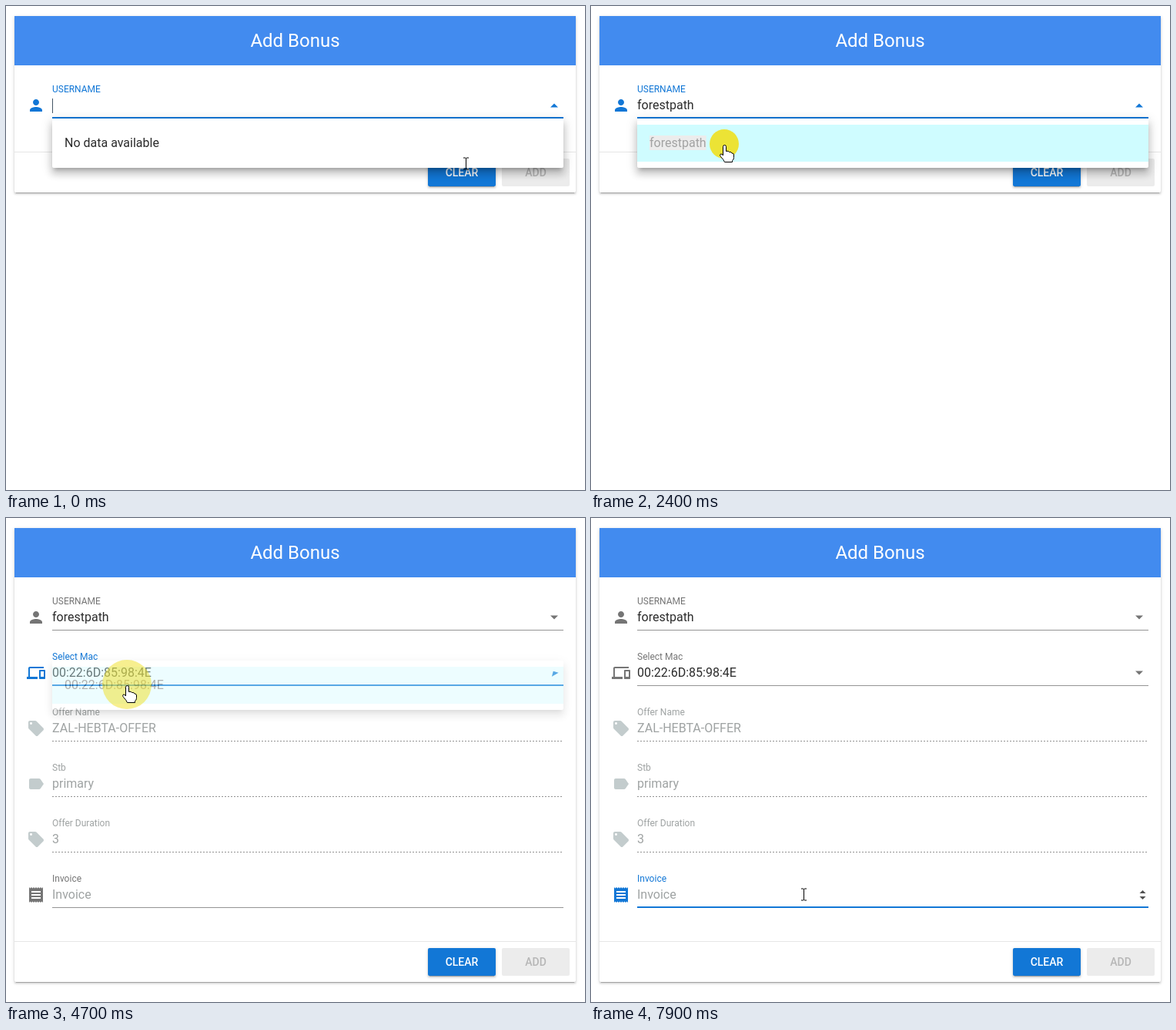
Animation, 752 px wide and 628 px high, one loop 8000 ms. Source, as an HTML page:

```html
<!DOCTYPE html>
<html lang="en">
<head>
<meta charset="utf-8">
<title>Add Bonus</title>
<style>
html, body { margin: 0; width: 100%; height: 100%; overflow: hidden; background: #fff; }
svg { display: block; font: 16px Roboto, sans-serif; }
text { white-space: pre; }
</style>
</head>
<body>
<svg id="stage" width="752" height="628" viewBox="0 0 752 628"></svg>
<script>
const LOOP = 8000, STEP = 100;
const BLUE = '#1277d6', INK = '#2b2b2b', GREY = '#757575', DIM = '#9fa3a3', PALE = '#c3cccd';
const LEFT = 60, WIDTH = 664, ROW = 72;
const USER = 'forestpath';
const USERS = ['forest_tdnhr', USER, 'foreland22', 'foamy_lake', 'foggy_mill', 'foxglove7'];
const MAC = '00:22:6D:85:98:4E';

const ICONS = {
  person: 'M12 12c2.21 0 4-1.79 4-4s-1.79-4-4-4-4 1.79-4 4 1.79 4 4 4zm0 2c-2.67 0-8 1.34-8 4v2h16v-2c0-2.66-5.33-4-8-4z',
  devices: 'M4 6h18V4H4c-1.1 0-2 .9-2 2v11H0v3h14v-3H4V6zm19 2h-6c-.55 0-1 .45-1 1v10c0 .55.45 1 1 1h6c.55 0 1-.45 1-1V9c0-.55-.45-1-1-1zm-1 9h-4v-7h4v7z',
  tag: 'M21.41 11.58l-9-9C12.05 2.22 11.55 2 11 2H4c-1.1 0-2 .9-2 2v7c0 .55.22 1.05.59 1.42l9 9c.36.36.86.58 1.41.58.55 0 1.05-.22 1.41-.59l7-7c.37-.36.59-.86.59-1.41 0-.55-.23-1.06-.59-1.42zM5.5 7C4.67 7 4 6.33 4 5.5S4.67 4 5.5 4 7 4.67 7 5.5 6.33 7 5.5 7z',
  label: 'M17.63 5.84C17.27 5.33 16.67 5 16 5L5 5.01C3.9 5.01 3 5.9 3 7v10c0 1.1.9 1.99 2 1.99L16 19c.67 0 1.27-.33 1.63-.84L22 12l-4.37-6.16z',
  receipt: 'M18 17H6v-2h12v2zm0-4H6v-2h12v2zm0-4H6V7h12v2zM3 22' + 'l1.5-1.5 1.5 1.5'.repeat(6) + 'V2' + 'l-1.5 1.5-1.5-1.5'.repeat(6) + 'z'
};
const POINTERS = {
  beam: ['M-3.5-7.5H-1L0-7 1-7.5H3.5M-3.5 7.5H-1L0 7 1 7.5H3.5M0-7V7', 'none'],
  arrow: ['M0 0V16l3.7-3.5 2.5 6 2.5-1-2.5-5.8H11.5Z', '#fff'],
  hand: ['M-2 2a2 2 0 0 1 4 0V8q3-1 4 1 3-.5 3.5 1.5 2.5 0 2.5 2V16q0 3-2 4v2H0q-1-3-5-7-2-3 .5-3.5 1.5 0 2.5 2Z', '#fff']
};

// Timelines: [time, value...]
const TYPED = [[0, 0], [400, 1], [500, 2], [700, 3], [800, 4], [1000, 6], [1200, 7], [1400, 9], [1500, 10]];
const POINTER = [[0, 'beam'], [2200, 'hand'], [2700, 'arrow'], [3500, 'hand'], [6100, 'arrow'], [6800, 'beam']];
const PATH = [[0, 597, 204], [200, 178, 130], [2000, 178, 130], [2300, 173, 180], [3300, 173, 180],
  [3500, 160, 198], [4000, 160, 198], [4300, 157, 217], [6000, 157, 217], [6100, 165, 241], [6900, 276, 488]];
const CLICKS = [2400, 3600, 4500, 7300];
const TO_MAC = 3730, TO_INVOICE = 7430;

const pen = document.createElement('canvas').getContext('2d');
const measure = s => (pen.font = '16px Roboto, sans-serif', pen.measureText(s).width);
const clamp = v => Math.max(0, Math.min(1, v));
const ease = p => 1 - (1 - p) ** 2;
const ramp = (t, start, span = 300) => clamp((t - start) / span);
const mix = (a, b, p) => a + (b - a) * p;
const at = (list, t) => list.findLast(k => k[0] <= t)[1];

const rect = (x, y, w, h, fill, more = '') =>
  `<rect x="${x}" y="${y}" width="${w}" height="${h}" fill="${fill}" ${more}/>`;
const text = (x, y, s, fill, size = 16, more = '') =>
  `<text x="${x}" y="${y}" fill="${fill}" font-size="${size}" ${more}>${s}</text>`;
const path = (d, x, y, fill, more = '') =>
  `<path d="${d}" transform="translate(${x} ${y})" fill="${fill}" ${more}/>`;

// Shadows as [offset, blur, spread, alpha]
const LOW = [[3, 1, -2, .2], [2, 2, 0, .14], [1, 5, 0, .12]];
const HIGH = [[5, 5, -3, .2], [8, 10, 1, .14], [3, 14, 2, .12]];
const raised = (x, y, w, h, fill, shadows) => shadows.map(([dy, blur, grow, a]) =>
  rect(x - grow, y + dy - grow, w + 2 * grow, h + 2 * grow, '#000',
    `opacity="${a}" style="filter:blur(${blur / 2}px)"`)).join('') + rect(x, y, w, h, fill, 'rx="2"');

function position(t) {
  const i = PATH.findIndex(k => k[0] > t);
  if (i < 0) return PATH.at(-1).slice(1);
  const [a, b] = [PATH[i - 1], PATH[i]], p = ramp(t, a[0], b[0] - a[0]);
  return [mix(a[1], b[1], p), mix(a[2], b[2], p)];
}

function field(row, icon, label, value, o = {}) {
  const y = row * ROW, { focus = false, line = 0, off = false, float = 1 } = o;
  const tone = focus ? BLUE : off ? DIM : GREY;
  let s = path(ICONS[icon], 27, 117 + y, focus ? BLUE : off ? PALE : GREY);
  s += text(LEFT, mix(134, 112, float) + y, label, tone, mix(16, 12, float));
  s += text(LEFT, 134 + y, value, o.hint || off ? DIM : INK);
  s += off
    ? `<path d="M${LEFT} ${145.5 + y}h${WIDTH}" stroke="#929292" stroke-dasharray="2 2"/>`
    : rect(LEFT, 145 + y, WIDTH, 1, o.hover ? INK : '#949494');
  if (line > 0) s += rect(LEFT + WIDTH * (1 - line) / 2, 144 + y, WIDTH * line, 2, focus ? BLUE : INK);
  if ('turn' in o) s += `<path d="M-5-2.5L0 2.5 5-2.5Z" fill="${tone}" transform="translate(712 ${129 + y}) rotate(${180 * o.turn})"/>`;
  return s;
}

function menu(y, items, opacity, o = {}) {
  if (opacity <= 0) return '';
  let s = raised(LEFT, y, WIDTH, Math.min(300, items.length * 48 + 16), '#fff', HIGH);
  if (o.picked) s += rect(LEFT, y + 8, WIDTH, 48, '#cffcff');
  items.forEach((item, i) => {
    const base = y + 37 + i * 48, match = o.match || '', w = measure(match);
    if (match) s += rect(76, base - 15, w, 19, '#ececec') + text(76, base, match, '#a2a2a2');
    s += text(76 + w, base, item.slice(match.length), INK);
  });
  return `<g opacity="${opacity}">${s}</g>`;
}

function button(x, y, s, fill, ink, shadows) {
  return raised(x, y, 88, 36, fill, shadows) +
    text(x + 44, y + 23, s, ink, 14, 'font-weight="500" text-anchor="middle"');
}

function draw(t) {
  const rows = t < 2600 ? 1 : t < 4600 ? 2 : 6, grow = (rows - 1) * ROW;
  const typed = USER.slice(0, at(TYPED, t));
  const toMac = ease(ramp(t, TO_MAC)), toInvoice = ease(ramp(t, TO_INVOICE));
  const onUser = t < TO_MAC, onInvoice = t >= TO_INVOICE, onMac = !onUser && !onInvoice;
  const caret = (x, y) => rect(x, y, 1, 19, '#456');

  let s = raised(11, 13, 729, 229 + grow, '#fff', LOW);
  s += rect(11, 13, 729, 64, '#428bef');
  s += text(375.5, 53, 'Add Bonus', '#fff', 24, 'text-anchor="middle"');
  s += rect(11, 189 + grow, 729, 1, '#e6e6e6');
  s += button(548, 198 + grow, 'CLEAR', BLUE, '#fff', LOW);
  s += button(644, 198 + grow, 'ADD', '#ececec', '#b6b6b6', []);

  s += field(0, 'person', 'USERNAME', typed, { focus: onUser, line: 1 - toMac, turn: 1 - ramp(t, 2550) });
  if (t < 1800) s += caret(LEFT + Math.round(measure(typed)), 120);
  if (rows > 1) s += field(1, 'devices', 'Select Mac', t < 4600 ? '' : MAC, {
    focus: onMac, line: toMac - toInvoice, float: toMac,
    turn: toMac * (1 - ramp(t, 4650))
  });
  if (rows > 2) {
    s += field(2, 'tag', 'Offer Name', 'ZAL-HEBTA-OFFER', { off: true });
    s += field(3, 'label', 'Stb', 'primary', { off: true });
    s += field(4, 'tag', 'Offer Duration', '3', { off: true });
    s += field(5, 'receipt', 'Invoice', 'Invoice', { focus: onInvoice, line: toInvoice, hint: true, hover: t >= 6800 });
    if (t >= 6800) s += path('M-4 4L0 0 4 4ZM-4 8L0 12 4 8Z', 716.5, 483, '#505050');
    if (onInvoice && t < 7900) s += caret(LEFT, 480);
  }

  const found = USERS.filter(u => u.startsWith(typed));
  s += menu(146, typed ? found : ['No data available'], 1 - ramp(t, 2430, 270), { match: typed, picked: t >= 2400 });
  s += menu(185, [MAC], ramp(t, 3650, 250) * (1 - ramp(t, 4530, 270)), { picked: t >= 4500 });

  const [x, y] = position(t);
  for (const c of CLICKS) {
    const age = t - c, alpha = .9 - age * .002;
    if (age >= 0 && alpha > 0)
      s += `<circle cx="${x}" cy="${y - 1}" r="${19 + age * .065}" fill="#f0e020" opacity="${alpha}"/>`;
  }
  const [shape, fill] = POINTERS[at(POINTER, t)];
  s += path(shape, x + .5, y + .5, fill, 'stroke="#000" stroke-linejoin="round"');
  return s;
}

const stage = document.getElementById('stage'), start = performance.now();
let last = -1;
function tick() {
  const t = Math.floor((performance.now() - start) % LOOP / STEP) * STEP;
  if (t !== last) stage.innerHTML = draw(last = t);
  requestAnimationFrame(tick);
}
tick();
</script>
</body>
</html>
```
